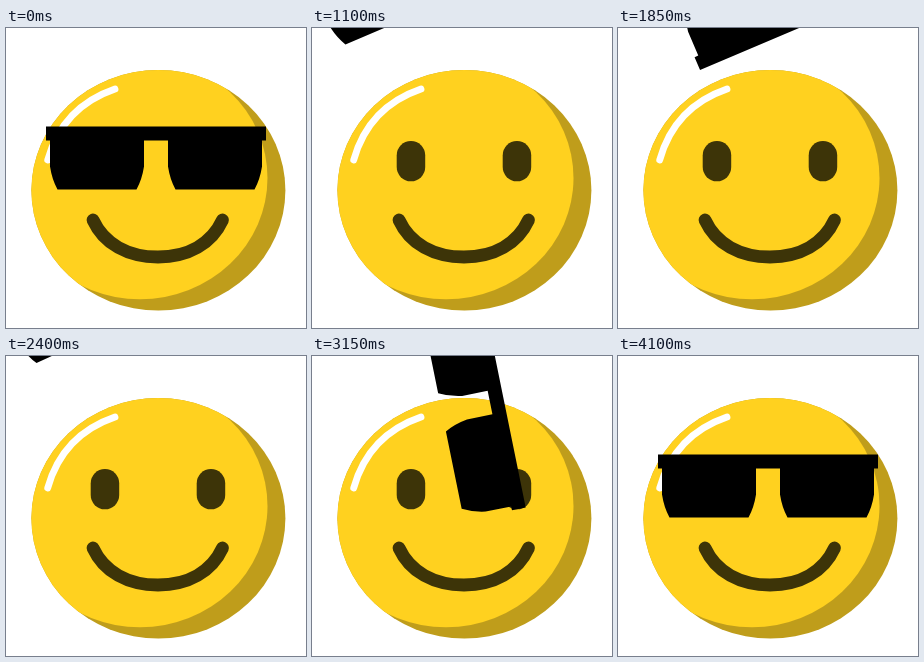
These frames come from a looping animation (300 px wide and 300 px high, 6.2 s). An HTML page:

```html
<!DOCTYPE html>
<html lang="en">
<head>
<meta charset="utf-8">
<title>Sunglasses smiley</title>
<style>
  html, body { margin: 0; width: 100%; height: 100%; overflow: hidden; background: #fff; }
  svg { display: block; width: 100%; height: 100%; }
</style>
</head>
<body>
<svg viewBox="0 0 300 300">
  <defs>
    <clipPath id="face"><ellipse cx="152.4" cy="162.3" rx="127" ry="120.3"/></clipPath>
  </defs>
  <ellipse cx="152.4" cy="162.3" rx="127" ry="120.3" fill="#bf9d1b"/>
  <ellipse cx="134" cy="150" rx="127.5" ry="121.3" fill="#ffd11f" clip-path="url(#face)"/>
  <path d="M109 61Q56.500 79 41.700 132" fill="none" stroke="#fff" stroke-width="6.800" stroke-linecap="round"/>
  <g fill="#3d3408">
    <rect x="84.700" y="113" width="28.500" height="40.300" rx="14.200"/>
    <rect x="190.700" y="113" width="28.500" height="40.300" rx="14.200"/>
  </g>
  <path d="M87 192C98 216 122 229 152 229S205.500 216 216.500 192" fill="none" stroke="#3d3408" stroke-width="12.800" stroke-linecap="round"/>
  <!-- drawn around its own centre -->
  <g id="shades">
    <path d="M-110-32H110V-18H106V8Q104 21 98.500 31H19.500Q14 21 12 8V-18H-12V8Q-14 21-19.500 31H-98.500Q-104 21-106 8V-18H-110Z"/>
  </g>
</svg>
<script>
  const LOOP = 6200, STEP = 50;
  const REST = { x: 150, y: 130.6, a: 0 };
  const HIGH = { x: 106.7, y: -62.6, a: -25 };
  const LOW = { x: 112, y: -50.6, a: -23 };
  // each toss: flick off, fall back in, land
  const TOSSES = [
    { off: 450, drop: 1100, land: 1350, from: LOW },
    { off: 1800, drop: 2400, land: 2700, from: HIGH },
    { off: 3150, drop: 3800, land: 4100, from: HIGH }
  ];
  const shades = document.getElementById('shades');
  const mix = (a, b, p) => a + (b - a) * p;

  function flick(n) {
    return { x: REST.x + 10.4 * n, y: REST.y - 80.5 * n, a: 78.5 * n };
  }

  function fall(from, p) {
    return {
      x: mix(from.x, REST.x, 1 - (1 - p) ** 2),
      y: mix(from.y, REST.y, p),
      a: mix(from.a, REST.a, p)
    };
  }

  function pose(t) {
    const s = TOSSES.find(k => t >= k.off && t < k.land);
    if (!s) return REST;
    if (t >= s.drop) return fall(s.from, (t - s.drop) / (s.land - s.drop));
    const n = (t - s.off) / STEP + 1;
    return n < 3 ? flick(n) : null;
  }

  function draw(ms) {
    const t = Math.floor((ms % LOOP) / STEP) * STEP;
    const p = pose(t);
    shades.setAttribute('visibility', p ? 'visible' : 'hidden');
    if (p) shades.setAttribute('transform', `translate(${p.x} ${p.y}) rotate(${p.a})`);
  }

  const start = performance.now();
  function tick() {
    draw(performance.now() - start);
    requestAnimationFrame(tick);
  }
  tick();
</script>
</body>
</html>
```
